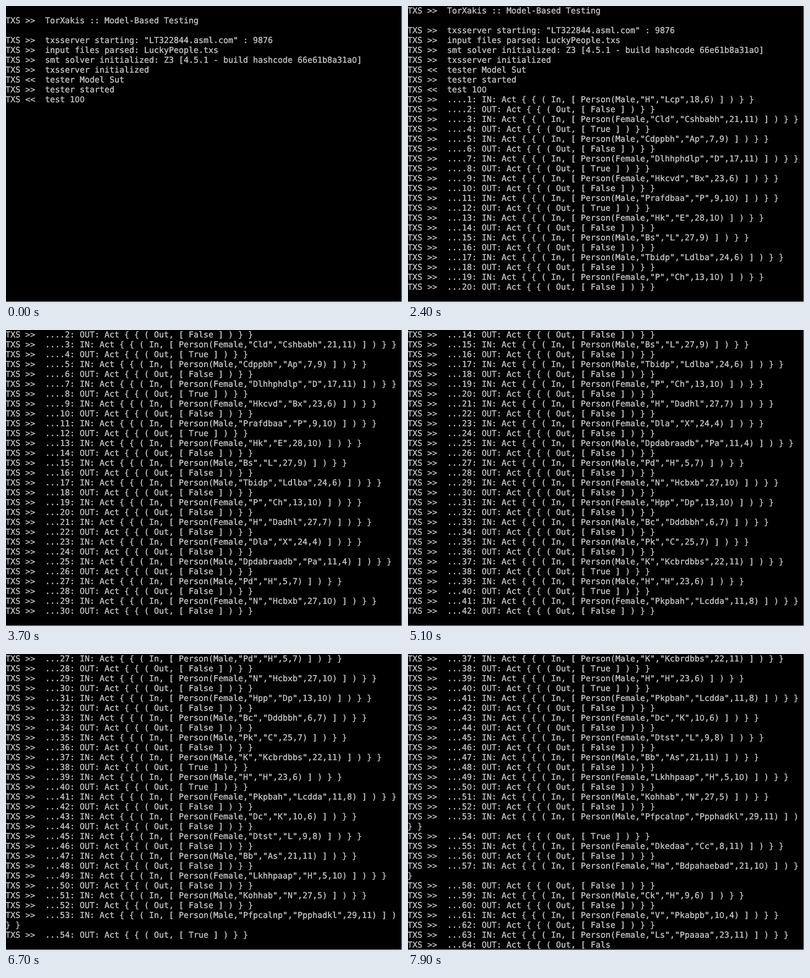
Recreate the animation shown at these times as an HTML page. Size 800 by 600 pixels, loop 8000 ms.

```html
<!DOCTYPE html>
<html lang="en">
<head>
<meta charset="utf-8">
<title>Console test run</title>
<style>
html, body { margin: 0; width: 100%; height: 100%; overflow: hidden; background: #000; }
#screen {
  position: absolute; left: 0; top: 0; width: 800px; height: 600px;
  box-sizing: border-box; overflow: hidden; background: #000; color: #c0c0c0;
  border: solid #c0c0c0; border-width: 0 1px 1px 0;
  font: 16.61px/20px "DejaVu Sans Mono", monospace;
  -webkit-text-stroke: .45px #c0c0c0;
  font-variant-ligatures: none; text-rendering: geometricPrecision;
}
.row { position: relative; left: -1px; height: 20px; white-space: pre; }
/* plain zero, same advance as the mono cells */
.row b { font: 15.72px/0 "DejaVu Sans", sans-serif; }
</style>
</head>
<body>
<div id="screen"></div>
<script>
const LOOP = 8000, TICK = 100, ROWS = 30, COLS = 80;

const intro = `
TXS >>  TorXakis :: Model-Based Testing

TXS >>  txsserver starting: "LT322844.asml.com" : 9876
TXS >>  input files parsed: LuckyPeople.txs
TXS >>  smt solver initialized: Z3 [4.5.1 - build hashcode 66e61b8a31a0]
TXS >>  txsserver initialized
TXS <<  tester Model Sut
TXS >>  tester started
TXS <<  test 100
`;

// wait in ticks, sex, names, date, and where the output stalls for one tick;
// "!" marks a lucky person
const people = `1 M H Lcp 18,6
3 F Cld Cshbabh 21,11!
1 M Cdppbh Ap 7,9
6 F Dlhhphdlp D 17,11! reply
2 F Hkcvd Bx 23,6
3 M Prafdbaa P 9,10!
2 F Hk E 28,10
1 M Bs L 27,9
3 M Tbidp Ldlba 24,6
1 F P Ch 13,10
2 F H Dadhl 27,7
2 F Dla X 24,4
5 M Dpdabraadb Pa 11,4
1 M Pd H 5,7
3 F N Hcbxb 27,10
2 F Hpp Dp 13,10
3 M Bc Dddbbh 6,7
1 M Pk C 25,7
4 M K Kcbrdbbs 22,11!
0 M H H 23,6!
4 F Pkpbah Lcdda 11,8
1 F Dc K 10,6
1 F Dtst L 9,8 reply
1 M Bb As 21,11
2 F Lkhhpaap H 5,10 person
3 M Kohhab N 27,5
6 M Pfpcalnp Ppphadkl 29,11!
2 F Dkedaa Cc 8,11
5 F Ha Bdpahaebad 21,10
3 M Ck H 9,6
2 F V Pkabpb 10,4
0 F Ls Ppaaaa 23,11 verdict`.split('\n');

const stalls = { reply: /(?<=\n)/, person: / ] /, verdict: /e ] / };

const prefix = n => `TXS >>  ${String(n).padStart(5, '.')}: `;

function exchange(n, sex, first, last, date) {
  const kind = sex === 'M' ? 'Male' : 'Female';
  const verdict = date.endsWith('!') ? 'True' : 'False';
  const person = `Person(${kind},"${first}","${last}",${date.replace('!', '')})`;
  return `${prefix(n)}IN: Act { { ( In, [ ${person} ] ) } }\n` +
         `${prefix(n + 1)}OUT: Act { { ( Out, [ ${verdict} ] ) } }\n`;
}

// Each step: the tick and everything printed so far.
const steps = [{ tick: 0, log: intro }];
let tick = 0, log = intro;
people.forEach((entry, i) => {
  const [wait, sex, first, last, date, stall] = entry.split(' ');
  const text = exchange(2 * i + 1, sex, first, last, date);
  tick += +wait;
  if (stall) {
    steps.push({ tick, log: log + text.slice(0, text.search(stalls[stall])) });
    tick++;
  }
  log += text;
  steps.push({ tick, log });
});

function rowHtml(line) {
  const safe = line.replace(/</g, '&lt;').replace(/>/g, '&gt;');
  return `<div class="row">${safe.replace(/0/g, '<b>0</b>')}</div>`;
}

function render(text) {
  const rows = text.split('\n').flatMap(line =>
    line.length > COLS ? [line.slice(0, COLS), line.slice(COLS)] : [line]);
  return rows.slice(-ROWS).map(rowHtml).join('');
}

const screenEl = document.getElementById('screen');
const start = performance.now();
let shown;

function draw(now) {
  const t = Math.max(0, now - start) % LOOP;
  const step = steps.findLast(s => s.tick * TICK <= t);
  if (step !== shown) {
    screenEl.innerHTML = render(step.log);
    shown = step;
  }
  requestAnimationFrame(draw);
}
draw(start);
</script>
</body>
</html>
```
